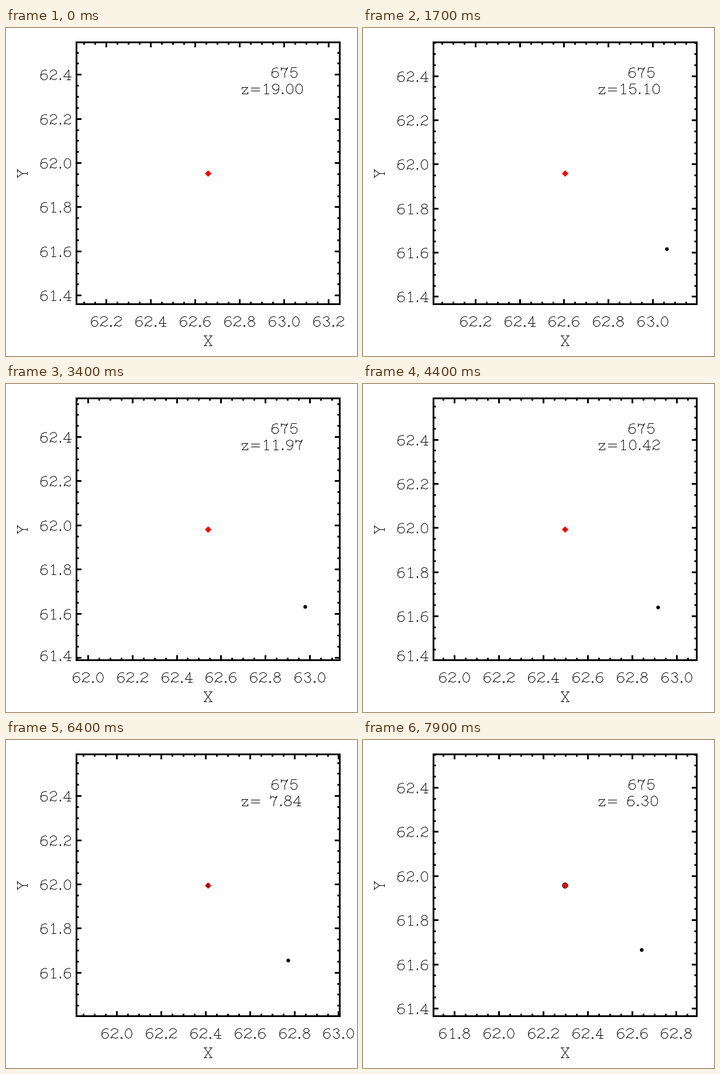
Animation of 600x560 px, one loop 8000 ms. Source, as a matplotlib script:

```python
import numpy as np
import matplotlib.pyplot as plt
from matplotlib.animation import FuncAnimation
from matplotlib.collections import LineCollection
from matplotlib.patches import Circle, Polygon, Rectangle

W, H, DPI = 600, 560, 100
FRAMES, INTERVAL = 80, 100
PX = 72 / DPI                      # one pixel in points
LEFT, RIGHT, TOP, BOTTOM = 120, 570, 24, 471
MID_X, MID_Y = 345, 248
HALF = 0.593                       # half width of the view in data units
SX, SY = (RIGHT - LEFT) / (2 * HALF), (BOTTOM - TOP) / (2 * HALF)
UNIT = 0.8                         # pixels per glyph unit


# Stroke font: x is centred on the glyph, y runs up from the baseline.
def line(*v):
    return np.reshape(v, (-1, 2)).astype(float)


def arc(cx, cy, rx, ry, a0=0, a1=360):
    a = np.radians(np.linspace(a0, a1, abs(a1 - a0) // 24 + 2))
    return np.column_stack([cx + rx * np.cos(a), cy + ry * np.sin(a)])


def bar(x, y, w=4):
    return line(x - w, y, x + w, y)


SIX = [arc(0, 6.5, 7, 6.5), arc(1.5, 10.5, 8.5, 10.5, 60, 200)]

GLYPHS = {
    "0": [arc(0, 10.5, 7, 10.5)],
    "1": [line(-4, 17, 1, 21, 1, 0), bar(1, 0)],
    "2": [arc(0, 15.5, 7, 5.5, 170, -40), line(5, 12, -4, 8, -7, 0),
          line(-7, 2, -4, 3, 3, 0, 7, 3)],
    "3": [arc(0, 16.5, 6, 4.5, 165, -90), arc(0, 6, 7, 6, 90, -165)],
    "4": [line(3, 0, 3, 21, -8, 6, 8, 6), bar(3, 0)],
    "5": [line(5, 21, -5, 21, -7, 11), arc(0, 7, 7, 7, 145, -160)],
    "6": SIX,
    "7": [line(-7, 15, -7, 21), line(-7, 17, -3, 20, 3, 18, 7, 21, 1, 9, 0, 0)],
    "8": [arc(0, 16.5, 6, 4.5), arc(0, 6, 7, 6)],
    "9": [[0, 21] - s for s in SIX],
    ".": [arc(0, 1, 1, 1)],
    "=": [bar(0, 12, 9), bar(0, 6, 9)],
    "z": [line(-7, 10, -7, 14, 6, 14, -7, 0, 6, 0, 6, 4)],
    "X": [line(-7, 21, 7, 0), line(7, 21, -7, 0)]
         + [bar(x, y, 3) for x in (-6, 6) for y in (0, 21)],
    "Y": [line(-7, 21, 0, 10, 7, 21), line(0, 10, 0, 0),
          bar(-6, 21, 3), bar(6, 21, 3), bar(0, 0, 3)],
    " ": [],
}
ADVANCE = {".": 10, "=": 26, " ": 16, "z": 18}


def text(s, x, base, align=0.0, upright=True):
    """Pixel polylines of a string; align is 0 left, 0.5 centre, 1 right."""
    widths = [ADVANCE.get(c, 20) for c in s]
    pen = -align * sum(widths)
    out = []
    for c, w in zip(s, widths):
        for stroke in GLYPHS[c]:
            u, v = (stroke + [pen + w / 2, 0]).T * UNIT
            p = (x + u, base - v) if upright else (x - v, base - u)
            out.append(np.floor(np.column_stack(p) + 0.5) + 0.5)
        pen += w
    return out


# Key points of the view centre: step, x, y.
KEYS = np.array([(0, 62.658, 61.9525), (17, 62.604, 61.9585),
                 (34, 62.541, 61.981), (44, 62.497, 61.9928),
                 (52, 62.4745, 62.011), (64, 62.411, 61.9945),
                 (79, 62.298, 61.957)])
DOT_START, RING_START = 9, 40


def centre(i):
    t, x, y = KEYS.T
    return np.interp(i, t, x), np.interp(i, t, y)


def redshift(i):
    return 20 * np.exp(-(0.012739 + 1.45e-7 * i) * i) - 1


def companion(i):
    j = i - 17
    return (63.063 - 0.00433 * j - 3.94e-5 * j * j,
            61.6165 + 0.00095 * j - 2.7e-6 * j * j)


def ring_radius(i):
    return 4.5 * (max(i - RING_START, 0) / (FRAMES - 1 - RING_START)) ** 1.5


def ticks(mid):
    """Yield value and whether it is a major tick, every 0.05."""
    lo, hi = (mid - HALF) * 20, (mid + HALF) * 20
    for k in range(int(np.ceil(lo)), int(np.floor(hi)) + 1):
        yield k / 20, k % 4 == 0


fig = plt.figure(figsize=(W / DPI, H / DPI), dpi=DPI, facecolor="white")
ax = fig.add_axes([0, 0, 1, 1])
ax.set_xlim(0, W)
ax.set_ylim(H, 0)
ax.axis("off")

ax.add_patch(Rectangle((LEFT + .5, TOP + .5), RIGHT - LEFT, BOTTOM - TOP,
                       fill=False, ec="black", lw=3 * PX, joinstyle="miter",
                       snap=False))
tick_lines = LineCollection([], colors="black", linewidths=3 * PX,
                            capstyle="butt", snap=False)
strokes = LineCollection([], colors="black", linewidths=PX,
                         capstyle="projecting", snap=False)
ax.add_collection(tick_lines, autolim=False)
ax.add_collection(strokes, autolim=False)

cx, cy, d = MID_X + .5, MID_Y + .5, 5.5
ax.add_patch(Polygon([(cx - d, cy), (cx, cy - d), (cx + d, cy), (cx, cy + d)],
                     fc="red", ec="none", snap=False, zorder=3))
ring = ax.add_patch(Circle((cx, cy), 1, fill=False, ec="black", lw=PX,
                           snap=False, zorder=4))
dot = ax.add_patch(Circle((0, 0), 3.2, fc="black", ec="none", snap=False,
                          zorder=3))

FIXED = (text("675", 451.6, 84) + text("X", MID_X, 542, 0.5)
         + text("Y", 36, MID_Y, 0.5, upright=False))


def draw(i):
    x0, y0 = centre(i)
    marks = []
    glyphs = FIXED + text(f"z={redshift(i):5.2f}", 401.4, 112)

    for v, major in ticks(x0):
        x = round(MID_X + (v - x0) * SX)
        n = 9 if major else 4.5
        marks += [[(x + .5, TOP), (x + .5, TOP + n)],
                  [(x + .5, BOTTOM + 1), (x + .5, BOTTOM + 1 - n)]]
        if major:
            glyphs = glyphs + text(f"{v:.1f}", x, 509, 0.5)

    for v, major in ticks(y0):
        y = min(max(round(MID_Y - (v - y0) * SY), TOP), BOTTOM)
        n = 9 if major else 4.5
        marks += [[(LEFT, y + .5), (LEFT + n, y + .5)],
                  [(RIGHT + 1, y + .5), (RIGHT + 1 - n, y + .5)]]
        if major:
            base = min(max(y + 9, 42), 472)     # keep labels inside the box
            glyphs = glyphs + text(f"{v:.1f}", 112.6, base, 1)

    tick_lines.set_segments(marks)
    strokes.set_segments(glyphs)

    px, py = companion(i)
    dot.set_visible(i >= DOT_START)
    dot.center = (round(MID_X + (px - x0) * SX) + .5,
                  round(MID_Y - (py - y0) * SY) + .5)
    ring.set_visible(i > RING_START)
    ring.set_radius(ring_radius(i))
    return tick_lines, strokes, dot, ring


anim = FuncAnimation(fig, draw, frames=FRAMES, interval=INTERVAL,
                     init_func=lambda: draw(0), repeat=True, repeat_delay=0)
plt.show()
```
